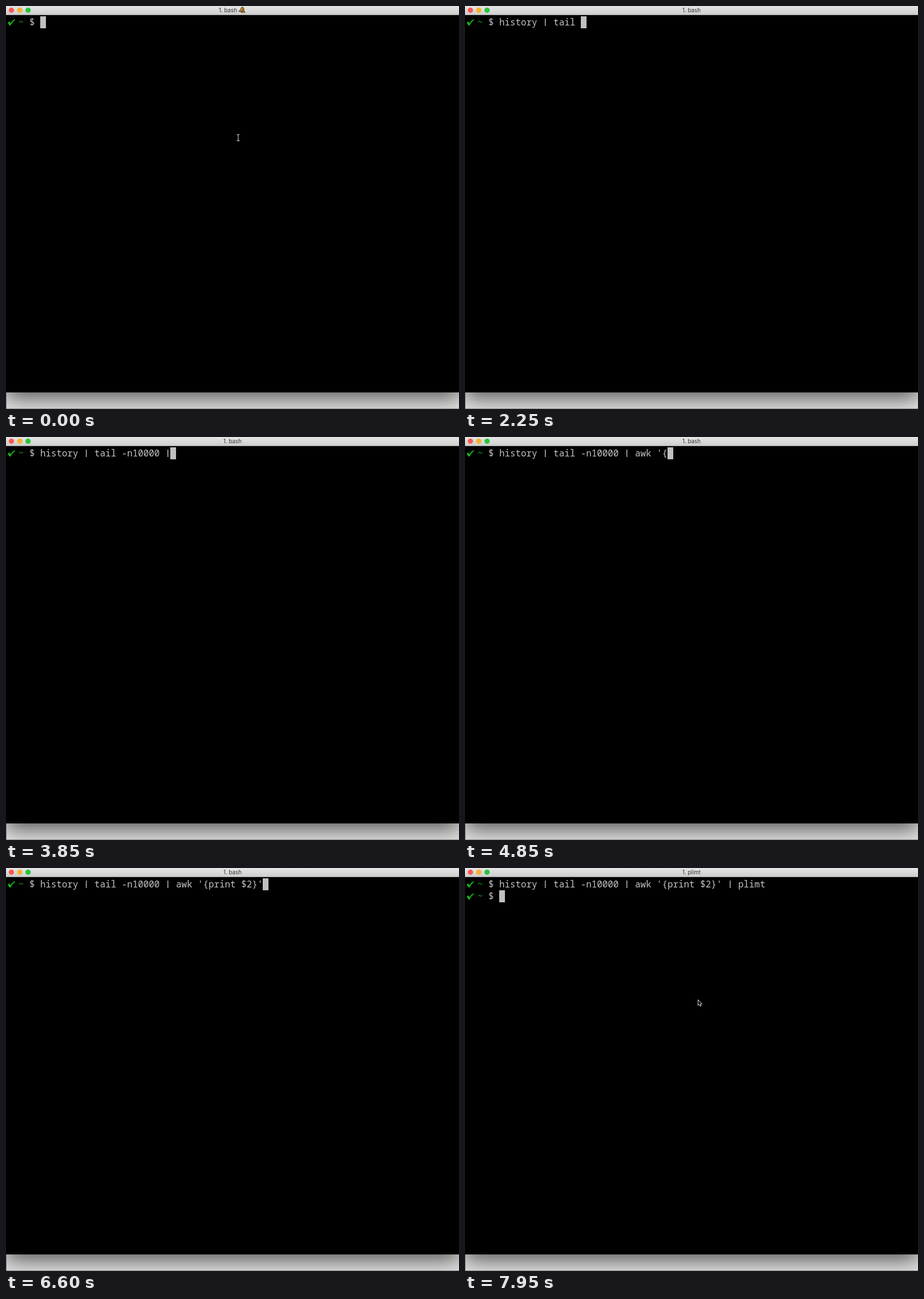
An HTML page with a canvas for the animation above (8 s loop, 794 by 705 pixels).

```html
<!DOCTYPE html>
<html lang="en">
<head>
<meta charset="utf-8">
<title>Terminal</title>
<style>
  html, body { margin: 0; width: 100%; height: 100%; overflow: hidden; background: #000; }
  canvas { display: block; }
</style>
</head>
<body>
<canvas id="stage" width="794" height="705"></canvas>
<script>
const ctx = document.getElementById('stage').getContext('2d');
const LOOP = 8000;
const CELL = 9.52, ROW = 21, LEFT = 2.8, TOP = 18;
const PROMPT_CELLS = 6;
const TOOL = 'plimt';
const COMMAND = `history | tail -n10000 | awk '{print $2}' | ${TOOL}`;
const GREY = '#c4c4c4';

// Typing bursts: start time, end time, characters typed by the end.
const BURSTS = [
  [500, 1150, 8], [1400, 2150, 15], [2450, 3800, 24],
  [4000, 5650, 38], [5850, 7200, 44], [7350, 7550, COMMAND.length]
];
const ENTER = 7600, PROMPT_BACK = 7700, POINTER_BACK = 7750;

function typedCount(t) {
  let count = 0;
  for (const [start, end, total] of BURSTS) {
    if (t < start) break;
    const progress = Math.min(1, (t - start) / (end - start));
    count += Math.floor((total - count) * progress);
  }
  return count;
}

function rect(x, y, w, h, color) {
  ctx.fillStyle = color;
  ctx.fillRect(x, y, w, h);
}

function shape(path, fill, stroke, width = 1) {
  const p = new Path2D(path);
  if (fill) { ctx.fillStyle = fill; ctx.fill(p); }
  if (stroke) { ctx.strokeStyle = stroke; ctx.lineWidth = width; ctx.stroke(p); }
}

function vertical(y0, y1, ...colors) {
  const g = ctx.createLinearGradient(0, y0, 0, y1);
  colors.forEach((c, i) => g.addColorStop(i / (colors.length - 1), c));
  return g;
}

function translated(x, y, draw) {
  ctx.save();
  ctx.translate(x, y);
  draw();
  ctx.restore();
}

function drawWindow() {
  rect(0, 670, 794, 35, '#e2e2e2');
  ctx.save();
  ctx.shadowColor = 'rgba(0,0,0,.62)';
  ctx.shadowBlur = 34;
  ctx.shadowOffsetY = 10;
  rect(0, 0, 794, 676, '#000');
  ctx.restore();
  rect(0, 676, 1, 29, '#777');
  rect(0, 704, 794, 1, '#888');
  rect(0, 0, 794, 15, vertical(0, 15, '#e6e6e6', '#cecece'));
  rect(0, 15, 794, 1, '#a5a5a5');
  ['#fc5753', '#f5b32b', '#25c63a'].forEach((color, i) => {
    ctx.beginPath();
    ctx.arc(9.5 + i * 14.6, 7.3, 4.6, 0, 7);
    ctx.fillStyle = color;
    ctx.fill();
  });
}

function drawBell() {
  translated(414, 7, () => {
    ctx.rotate(0.2);
    shape('M-1-5C2-6 3-2 3 0L5.5 3.5L-5.5 3.5L-3 0C-3-2-3-4-1-5Z', '#9a6a20', '#4d3314', .8);
    shape('M-1-3L-2 1', null, '#e5b451', 1.3);
    shape('M-1.5 4a1.6 1.6 0 0 0 3 0Z', '#4d3314');
  });
}

function drawTitle(text, bell) {
  ctx.font = '9.8px Inter, sans-serif';
  ctx.textAlign = 'center';
  ctx.fillStyle = '#333';
  ctx.fillText(text, bell ? 389 : 397, 11);
  if (bell) drawBell();
}

function drawText(text, cell, row, color) {
  ctx.font = '15.87px "Noto Sans Mono", monospace';
  ctx.textAlign = 'left';
  [...text].forEach((char, i) => {
    const x = LEFT + (cell + i) * CELL, y = TOP + row * ROW;
    if (char === '|') return rect(Math.round(x + 4), y + 4, 1.4, 13, color);
    ctx.fillStyle = color;
    ctx.fillText(char, x, y + 16);
  });
}

function drawPrompt(row) {
  translated(3, TOP + row * ROW, () =>
    shape('M0 11L3 9L5 12Q8 7 12 5L13 6Q8 10 5 16L3 16Z', '#13b51b'));
  drawText('~', 2, row, '#12a51b');
  drawText('$', 4, row, GREY);
}

function drawBeam() {
  translated(407, 230, () =>
    shape('M-2.5-5.5Q0-5.5 0-3.5Q0-5.5 2.5-5.5M0-4V5M-2.5 6Q0 6 0 4Q0 6 2.5 6', null, '#ccc', 1.1));
}

function drawArrow() {
  translated(408, 230, () =>
    shape('M.5.5V10.5L2.8 8.4L4.3 12L6 11.2L4.5 7.8H7.5Z', '#000', '#ddd', 1));
}

function draw(t) {
  const count = typedCount(t);
  const entered = t >= ENTER;
  const ready = t >= PROMPT_BACK;
  const idle = count === 0;

  drawWindow();
  drawTitle(entered ? `1. ${TOOL}` : '1. bash', idle);
  drawPrompt(0);
  drawText(COMMAND.slice(0, count), PROMPT_CELLS, 0, GREY);
  if (ready) drawPrompt(1);

  const cell = entered ? (ready ? PROMPT_CELLS : 0) : PROMPT_CELLS + count;
  rect(Math.round(LEFT + cell * CELL), TOP + (entered ? ROW : 0), 10, ROW, '#c0c0c0');

  if (idle) drawBeam();
  if (t >= POINTER_BACK) drawArrow();
}

function frame() {
  draw(performance.now() % LOOP);
  requestAnimationFrame(frame);
}
frame();
</script>
</body>
</html>
```
